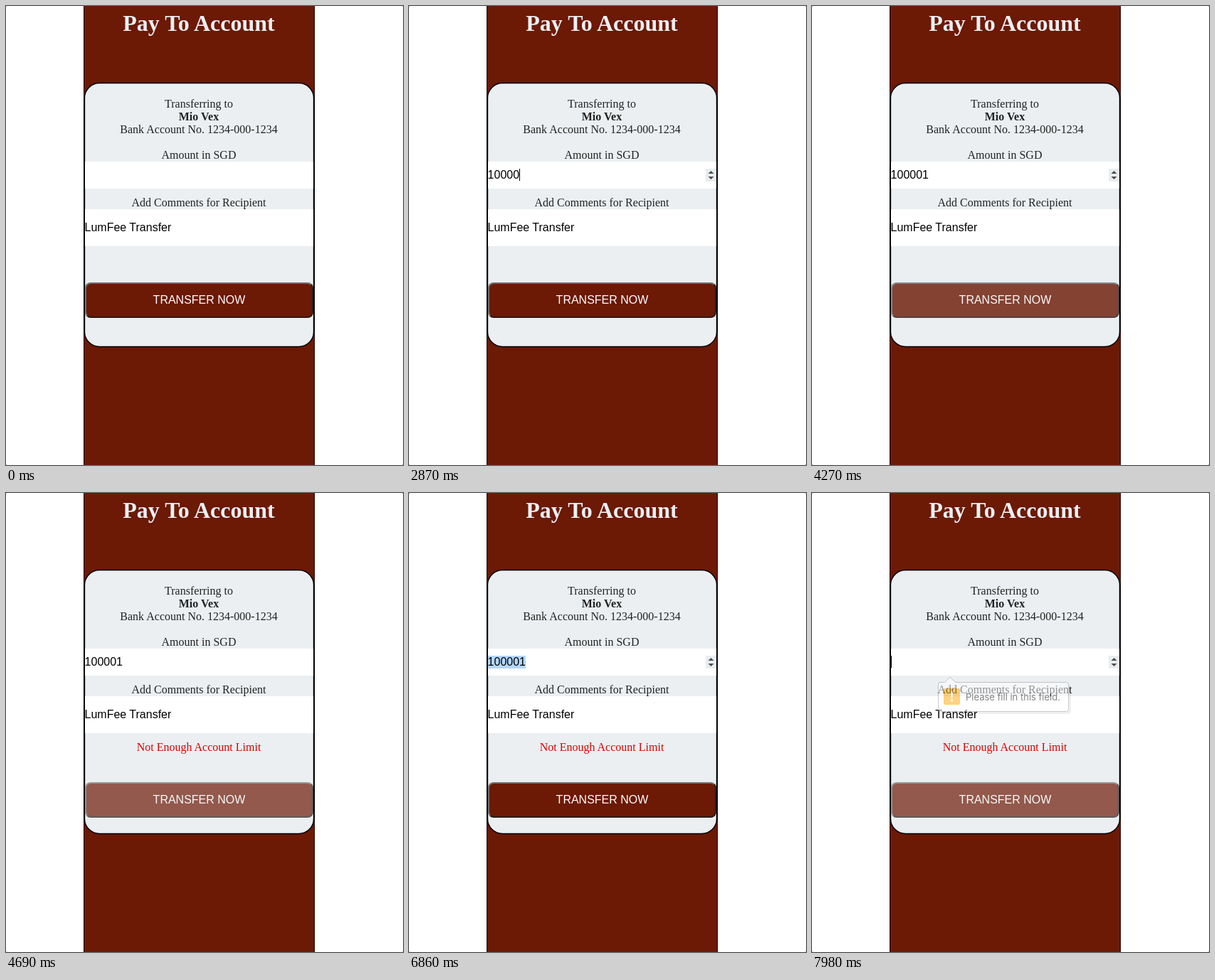
Write an HTML page that moves like this. It is 558 px wide and 646 px high and loops after 8 s.

```html
<!DOCTYPE html>
<html lang="en">
<head>
<meta charset="utf-8">
<title>Pay To Account</title>
<style>
  :root { --maroon: #6c1905; --pale: #ebeff2; --loop: 8000ms infinite; }
  html, body { margin: 0; width: 100%; height: 100%; overflow: hidden; background: #999; }
  .stage { position: relative; width: 558px; height: 646px; overflow: hidden; background: #fff; border-radius: 2px; }
  svg { position: absolute; left: 0; top: 0; }
  .label { font: 16px "Liberation Serif", serif; text-anchor: middle; fill: #222; }
  .bold { font-weight: bold; }
  .title { font-size: 32px; font-weight: bold; fill: var(--pale); }
  .error { fill: #e00000; animation: error step-end var(--loop); }
  .sans { font: 16px "Liberation Sans", sans-serif; }
  .spinner { animation: spinner step-end var(--loop); }
  .popup { animation: popup linear var(--loop); }
  .hint { font: 13px Inter, sans-serif; fill: #111; }

  .amount {
    position: absolute; left: 110.6px; top: 229px; height: 18px; line-height: 18px;
    animation: typing step-end var(--loop);
  }
  .digits { width: 100%; height: 18px; overflow: hidden; white-space: nowrap; animation: select step-end var(--loop); }
  .caret {
    position: absolute; left: 100%; top: 0; width: 1px; height: 17px; background: #000;
    animation: caret step-end var(--loop);
  }
  .button {
    position: absolute; left: 111px; top: 389px; width: 321px; height: 50px; box-sizing: border-box;
    border: 2px solid; border-color: #6f6f6f #2b1a16 #2b1a16 #6f6f6f; border-radius: 8px;
    background: var(--maroon); color: #fff; line-height: 45px; text-align: center;
    animation: hover ease-in-out var(--loop), drop step-end var(--loop);
  }

  @keyframes typing {
    0% { width: 0 }
    19.25% { width: 1ch }
    21% { width: 2ch }
    25.375% { width: 3ch }
    30.625% { width: 4ch }
    35.875% { width: 5ch }
    42% { width: 6ch }
    86.625%, 100% { width: 0 }
  }
  @keyframes caret {
    0%, 13.125%, 48.125%, 96.25% { opacity: 0 }
    7%, 19.25%, 86.625%, 98.875%, 100% { opacity: 1 }
  }
  @keyframes spinner {
    0%, 55.125%, 70% { opacity: 0 }
    7%, 69.125%, 73.5%, 100% { opacity: 1 }
  }
  @keyframes select {
    0%, 86.625%, 100% { background: transparent }
    76.125% { background: #b3d7ff }
  }
  @keyframes error {
    0% { opacity: 0 }
    56.875%, 100% { opacity: 1 }
  }
  @keyframes drop {
    0% { top: 389px }
    56.875%, 100% { top: 407px }
  }
  @keyframes hover {
    0%, 51.1875%, 63.875%, 85.5% { opacity: 1 }
    54.9375%, 60.375%, 89.25%, 100% { opacity: .7 }
  }
  @keyframes popup {
    0%, 90% { opacity: 0; animation-timing-function: cubic-bezier(.4, 0, .2, 1) }
    95.875%, 98% { opacity: 1 }
    100% { opacity: .45 }
  }
</style>
</head>
<body>
<div class="stage">
  <svg width="558" height="646">
    <rect x="109" width="325" height="646" fill="#1c0501"/>
    <rect x="110" width="323" height="646" fill="var(--maroon)"/>
    <rect x="110.5" y="108.5" width="322" height="371" rx="21" fill="var(--pale)" stroke="#000" stroke-width="1.4"/>
    <path d="M109.5 130V458M433.5 130V458" stroke="#000"/>
    <path d="M111 219H432V257H111ZM111 286H432V338H111Z" fill="#fff"/>

    <text class="label title" x="271" y="35">Pay To Account</text>
    <text class="label" x="271" y="143">Transferring to</text>
    <text class="label bold" x="271" y="161">Mio Vex</text>
    <text class="label" x="271" y="179">Bank Account No. 1234-000-1234</text>
    <text class="label" x="271" y="215">Amount in SGD</text>
    <text class="label" x="271" y="282">Add Comments for Recipient</text>
    <text class="label error" x="271" y="363">Not Enough Account Limit</text>
    <text class="sans" x="110.5" y="317">LumFee Transfer</text>

    <g class="spinner">
      <rect x="417" y="229" width="15" height="18" fill="#e9edf0"/>
      <path d="M420.5 236L424.5 232L428.5 236ZM420.5 240L424.5 244L428.5 240Z" fill="#4d4d4d"/>
    </g>
  </svg>

  <div class="amount sans"><div class="digits">100001</div><div class="caret"></div></div>
  <div class="button sans">TRANSFER NOW</div>

  <svg class="popup" width="558" height="646">
    <rect x="180" y="270" width="184" height="41" rx="4" fill="#000" opacity=".12"/>
    <path d="M180.5 266.5H186.5L194 259L201.5 266.5H357.5Q360.5 266.5 360.5 269.5V304.5Q360.5 307.5 357.5 307.5H180.5Q177.5 307.5 177.5 304.5V269.5Q177.5 266.5 180.5 266.5Z" fill="#fff" stroke="#999"/>
    <rect x="185" y="275" width="23" height="23" rx="2" fill="#ffa90a"/>
    <path d="M195 279H198L197.6 288.5H195.4ZM195 290.5H198V293.5H195Z" fill="#fff"/>
    <text class="hint" x="216" y="292">Please fill in this field.</text>
  </svg>
</div>
</body>
</html>
```
